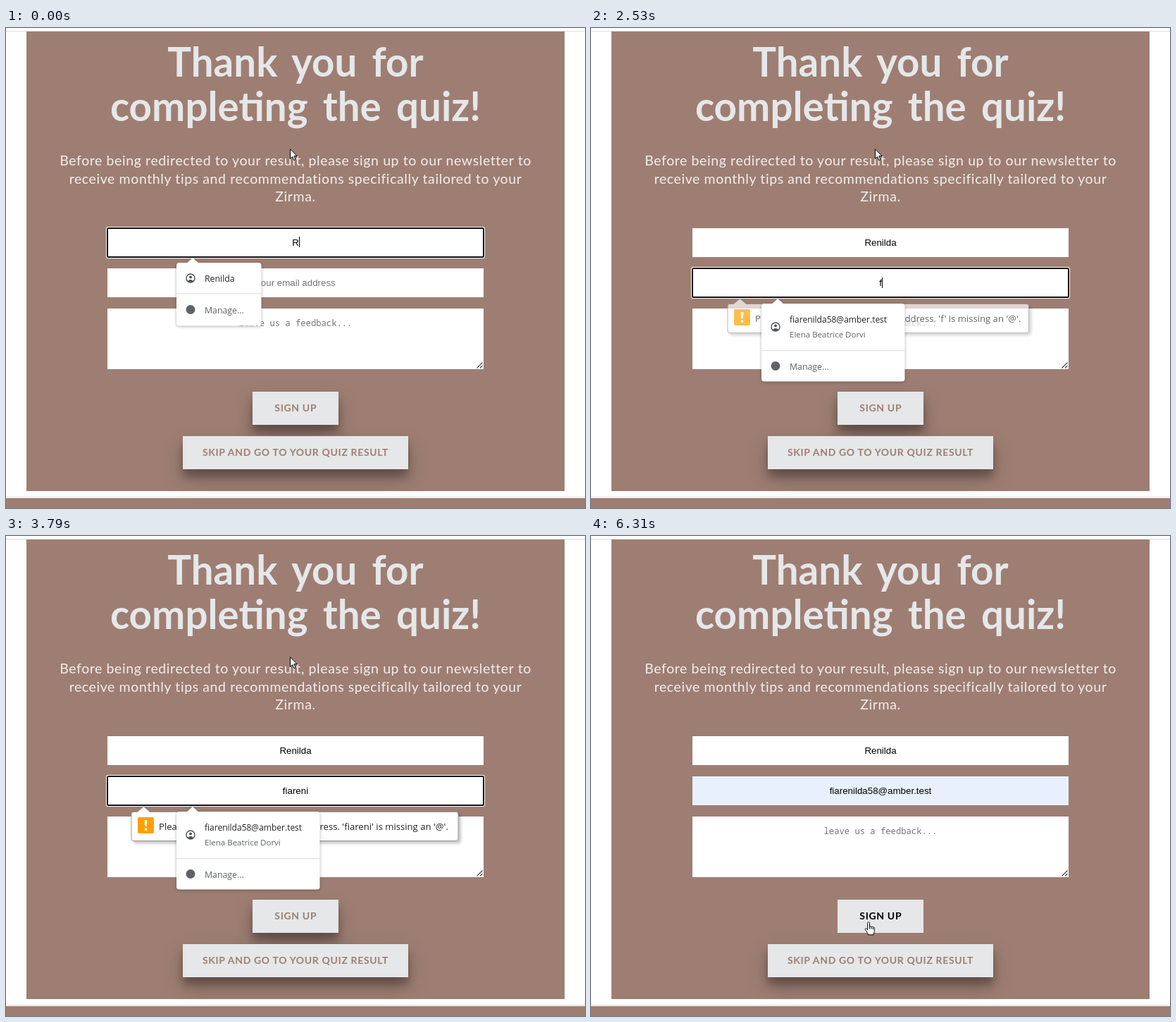
An HTML page that plays this animation: 822 px wide and 681 px high, repeating every 8000 ms.

```html
<!DOCTYPE html>
<html lang="en">
<head>
<meta charset="utf-8">
<title>Quiz sign-up</title>
<style>
  html, body { margin: 0; width: 100%; height: 100%; overflow: hidden; background: #fff; }
  div, svg { position: absolute; }
  #panel { left: 29px; top: 5px; width: 764px; height: 652px; background: #9e7e73; }
  #footer { left: 0; top: 667px; width: 822px; height: 14px; background: #9e7e73; }
  .rule { left: 0; width: 822px; height: 1px; background: #dcdcdc; }
  .btn { background: #e5e7e8; height: 47px;
    box-shadow: 0 14px 28px rgba(0,0,0,.25), 0 10px 10px rgba(0,0,0,.22); }
  #sign { left: 350px; top: 516px; width: 122px; }
  #skip { left: 251px; top: 579px; width: 320px; }
  svg { left: 0; top: 0; }
  .mid { text-anchor: middle; }
  .head { font: 700 56.5px Lato, sans-serif; fill: #e5e7e8; word-spacing: 7.5px; }
  .para { font: 400 19.5px Lato, sans-serif; fill: #f0eeed; letter-spacing: .6px; }
  .label { font: 700 14px Lato, sans-serif; fill: #9e7e73; letter-spacing: .66px; }
  .input { font: 13.333px "Liberation Sans", Arial, sans-serif; fill: #000; }
  .hint { fill: #757575; }
  .mono { font: 12.2px "Noto Sans Mono", monospace; fill: #757575; }
  .menu { font: 12.3px "Open Sans", sans-serif; fill: #202124; }
  .menu .dim { fill: #5f6368; }
  .menu { filter: drop-shadow(0 1px 2px rgba(0,0,0,.3)); }
  .tip { font: 13.1px "Open Sans", sans-serif; fill: #222; filter: drop-shadow(3px 3px 2px rgba(0,0,0,.25)); }
</style>
</head>
<body>
<div class="rule" style="top:4px"></div>
<div id="panel"></div>
<div class="rule" style="top:665px"></div>
<div id="footer"></div>
<div id="sign" class="btn"></div>
<div id="skip" class="btn"></div>

<svg width="822" height="681" viewBox="0 0 822 681">
  <defs>
    <g id="person" fill="none" stroke="#4a4e52" stroke-width="1.4">
      <circle r="6"/>
      <circle cy="-1.6" r="1.9" fill="#4a4e52" stroke="none"/>
      <path d="M-4.2 4.2Q0 -.2 4.2 4.2Q0 7 -4.2 4.2z" fill="#4a4e52" stroke="none"/>
    </g>
  </defs>

  <g class="mid">
    <text class="head" x="411" y="68.5">Thank you for</text>
    <text class="head" x="411" y="132">completing the quiz!</text>
    <text class="para" x="411" y="195">Before being redirected to your result, please sign up to our newsletter to</text>
    <text class="para" x="411" y="220.5">receive monthly tips and recommendations specifically tailored to your</text>
    <text class="para" x="411" y="246">Zirma.</text>
    <text class="label" id="signText" x="411.3" y="544">SIGN UP</text>
    <text class="label" x="411" y="607">SKIP AND GO TO YOUR QUIZ RESULT</text>
  </g>

  <g fill="#fff">
    <rect x="144" y="284" width="534" height="41"/>
    <rect id="mailBox" x="144" y="341" width="534" height="41"/>
    <rect x="144" y="398" width="534" height="86"/>
  </g>
  <path d="M668.5 482.5l8-8M673 482.5l3.500-3.500" stroke="#444" stroke-width="1.1"/>
  <g id="ring">
    <rect x="142" y="282" width="538" height="45" rx="3" fill="#fff"/>
    <rect x="143" y="283" width="536" height="43" rx="2.500" fill="#101010"/>
    <rect id="ringFill" x="145" y="285" width="532" height="39" rx="1"/>
  </g>

  <g class="mid">
    <text class="input" id="name" x="411" y="308.500"></text>
    <text class="input hint" id="hint" x="411" y="365.500">Your email address</text>
    <text class="input" id="mail" x="411" y="365.500"></text>
    <text class="mono" x="411" y="423">leave us a feedback...</text>
  </g>
  <rect id="caret" width="1" height="15"/>

  <g id="tip" class="tip">
    <path id="tipBox" fill="#fff" stroke="#9a9a9a"/>
    <rect x="9" y="399" width="23" height="23" rx="2" fill="#ffa000"/>
    <path d="M18.700 403h3.600l-.5 9h-2.600zM18.900 414.500h3.200v3.200h-3.200z" fill="#fff"/>
    <text id="tipText" x="39" y="417"></text>
  </g>

  <g id="nameMenu" class="menu">
    <path d="M256 334l9-8 9 8z" fill="#fff"/>
    <rect x="242" y="333" width="120.500" height="89.500" rx="4" fill="#fff"/>
    <rect x="242" y="376.500" width="120.500" height="1" fill="#dadce0"/>
    <use href="#person" x="262" y="355"/>
    <text x="282" y="360">Renilda</text>
    <circle cx="262" cy="399.500" r="6.500" fill="#5f6368"/>
    <text class="dim" x="282" y="404.500">Manage...</text>
  </g>

  <g id="mailMenu" class="menu">
    <path d="M256 392l9-8 9 8z" fill="#fff"/>
    <rect x="242" y="391" width="203.500" height="110.500" rx="4" fill="#fff"/>
    <path id="pick" d="M242 453.500v-58.500q0-4 4-4h195.500q4 0 4 4v58.500z" fill="#e9eaeb"/>
    <rect x="242" y="457" width="203.500" height="1" fill="#dadce0"/>
    <use href="#person" x="262" y="424"/>
    <text x="282" y="418" font-size="12" style="font-size:12px">fiarenilda58@amber.test</text>
    <text class="dim" x="282" y="438.500" style="font-size:11.500px">Elena Beatrice Dorvi</text>
    <circle cx="262" cy="479.500" r="6.500" fill="#5f6368"/>
    <text class="dim" x="282" y="485">Manage...</text>
  </g>

  <g stroke="#000" fill="#fff" stroke-linejoin="round">
    <path id="arrow" d="M.5 .8V14.600l3.100-3 2.200 5 2.200-1-2.200-4.900h4.300z"/>
    <path id="hand" d="M-1.300 1.300c0-2 2.800-2 2.800 0v5.200c.3-1.300 2.500-1.100 2.500.3 .4-1 2.300-.8 2.300.5 .5-.8 2-.5 2 .8v4.400c0 1.800-1 2.700-1.200 5.300H-.3c-.3-2.400-2.600-4.300-4.200-7.200-.8-1.500.9-2.500 2-1.300l1.200 1.400zM1.500 6.500v3M4 7v2.700M6.300 7.800v2.200"/>
  </g>
</svg>

<script>
  const LOOP = 8000, CX = 411;
  const NAME = "Renilda", MAIL = "fiarenilda58@amber.test";
  const nameKeys = [0, 330, 400, 480, 1060, 1150, 1320];
  const mailKeys = [2400, 2610, 2720, 2820, 3030, 3150, 3310];
  const FOCUS = 1750, PREVIEW = 3960, ACCEPT = 4330, CLOSED = 4400;
  const MOVE = 5280, ARRIVE = 5850, CLICK = 6310;

  const $ = id => document.getElementById(id);
  const set = (id, attr, value) => $(id).setAttribute(attr, value);
  const show = (id, on) => set(id, "visibility", on ? "visible" : "hidden");
  const clamp = v => Math.max(0, Math.min(1, v));
  const ramp = (t, from, span) => clamp((t - from) / span);
  const typed = (t, keys) => keys.filter(k => t >= k).length;
  const within = (t, a, b) => t >= a && t < b;

  function write(id, text) {
    if ($(id).textContent !== text) $(id).textContent = text;
  }

  function place(id, opacity, scale = 1, x = 344, y = 446) {
    show(id, opacity > 0);
    set(id, "opacity", opacity);
    set(id, "transform", `translate(${x} ${y}) scale(${scale}) translate(${-x} ${-y})`);
  }

  function drawFields(t) {
    const n = typed(t, mailKeys);
    const onMail = t >= FOCUS, blue = t >= PREVIEW;
    const field = onMail ? "mail" : "name";
    const fill = blue ? "#e8f0fe" : "#fff";
    write("name", NAME.slice(0, typed(t, nameKeys)));
    write("mail", blue ? MAIL : MAIL.slice(0, n));
    show("hint", n === 0);
    show("ring", t < CLICK);
    set("ring", "transform", `translate(0 ${onMail ? 57 : 0})`);
    set("ringFill", "fill", fill);
    set("mailBox", "fill", fill);

    const lit = t < 3790 || within(t, ACCEPT, 4810) || within(t, 5310, 5810);
    const len = $(field).textContent ? $(field).getComputedTextLength() : 0;
    show("caret", lit);
    set("caret", "x", Math.round(CX + len / 2));
    set("caret", "y", onMail ? 354 : 296);
  }

  function drawMenus(t) {
    const out = ramp(t, FOCUS, 140);
    place("nameMenu", 1 - out, 1 - .04 * out, 302, 378);
    const come = ramp(t, mailKeys[0], 130);
    if (t < ACCEPT) place("mailMenu", come, .96 + .04 * come);
    else place("mailMenu", t < CLOSED ? .5 : 0, .967);
    show("pick", within(t, PREVIEW, CLOSED));
  }

  function drawTip(t) {
    const n = typed(t, mailKeys), d = n - 4;
    let left = 322, width = 176, text = "Please fill in this field.";
    if (n) {
      left = 188 - d * (d > 0 ? 10 / 3 : 2);
      width = 435 + d * (d > 0 ? 29 / 3 : 2.5);
      text = `Please include an '@' in the email address. '${MAIL.slice(0, n)}' is missing an '@'.`;
    }
    const start = n ? mailKeys[n - 1] : 1800;
    const alpha = t < ACCEPT ? ramp(t, start, 190) : t < CLOSED ? .23 : 0;
    if (t >= ACCEPT) width += 2;
    write("tipText", text);
    show("tip", alpha > 0);
    set("tip", "opacity", alpha);
    set("tip", "transform", `translate(${left} 0)`);
    set("tipBox", "d", `M3 391.500H8.500l9-7.500 9 7.500H${width - 3}q3 0 3 3v35q0 3-3 3H3q-3 0-3-3v-35q0-3 3-3z`);
  }

  function drawPointer(t) {
    const p = ramp(t, MOVE, ARRIVE - MOVE);
    const u = p * p * (3 - 2 * p), v = 1 - u;
    const x = v * v * 403 + 2 * u * v * 625 + u * u * 394;
    const y = v * v * 171 + 2 * u * v * 345 + u * u * 548;
    const over = x < 472 && y > 516;
    for (const id of ["arrow", "hand"]) set(id, "transform", `translate(${x} ${y})`);
    show("arrow", !over);
    show("hand", over);

    const h = over ? ramp(t, 5770, 280) : 0, k = 1 - h;
    $("sign").style.boxShadow =
      `0 14px 28px rgba(0,0,0,${.25 * k}), 0 10px 10px rgba(0,0,0,${.22 * k})`;
    $("signText").style.fill = `rgb(${158 * k},${126 * k},${115 * k})`;
  }

  function frame() {
    const t = performance.now() % LOOP;
    drawFields(t);
    drawMenus(t);
    drawTip(t);
    drawPointer(t);
    requestAnimationFrame(frame);
  }
  frame();
</script>
</body>
</html>
```
